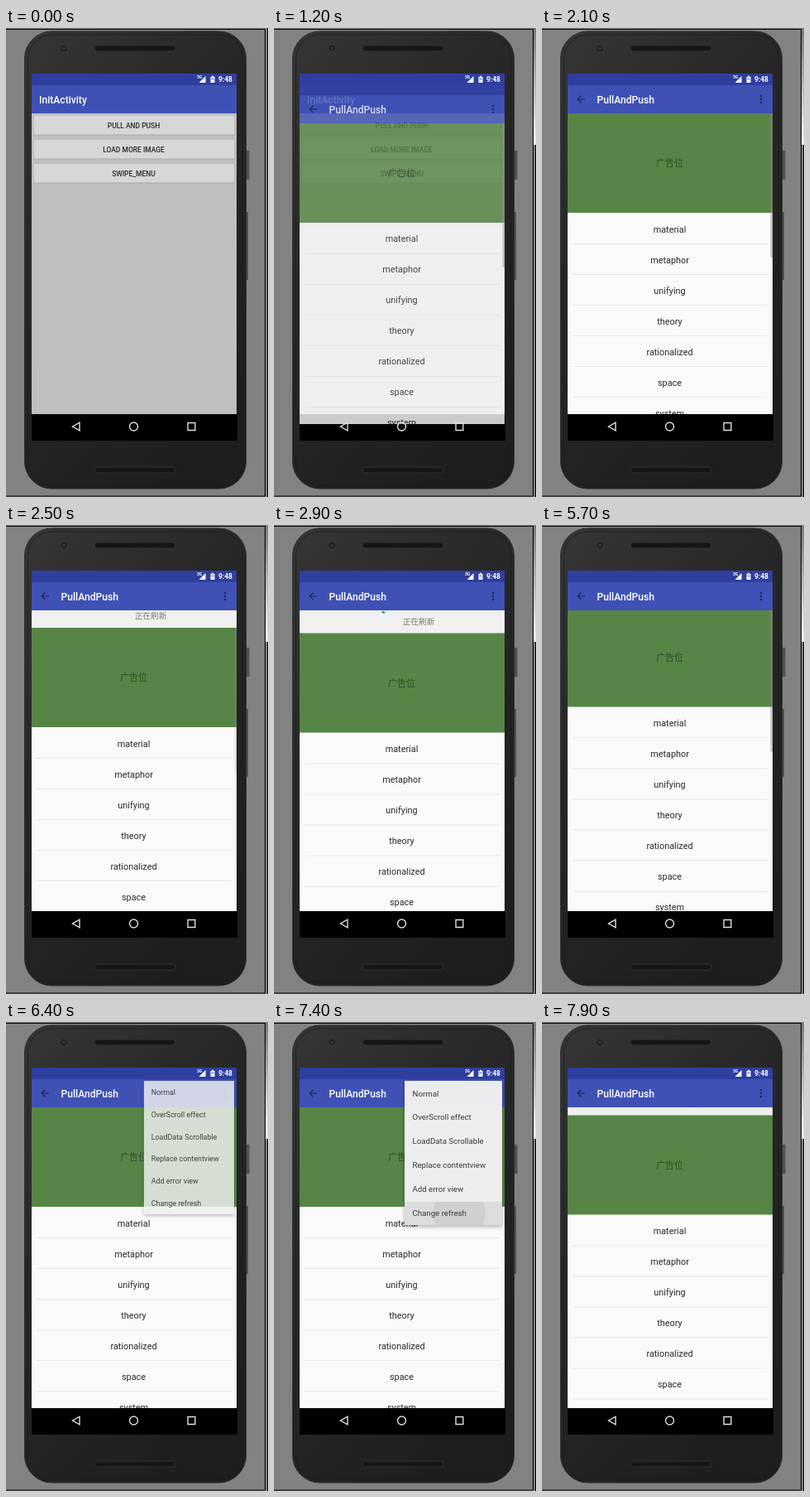
Recreate the animation shown at these times as an HTML page. Size 317x566 px, loop 8000 ms.

```html
<!DOCTYPE html>
<html lang="zh-CN">
<head>
<meta charset="utf-8">
<style>
  html, body { margin: 0; width: 100%; height: 100%; overflow: hidden; background: #828282; }
  svg { display: block; font-family: Roboto, 'Noto Sans CJK SC', 'Noto Sans CJK', sans-serif; }
  .mid { text-anchor: middle; }
  .title { font-size: 12.1px; font-weight: 500; fill: #fff; }
  .button { font-size: 8.46px; font-weight: 500; fill: #2a2a2a; }
  .row { font-size: 10.87px; fill: #2a2a2a; }
  .item { font-size: 9.67px; fill: #3a3a3a; }
  .card { filter: drop-shadow(0 2px 2.5px rgba(0, 0, 0, .3)); }
</style>
</head>
<body>
<svg width="317" height="566" viewBox="0 0 317 566">
  <defs>
    <linearGradient id="body" x2=".6" y2="1">
      <stop offset="0" stop-color="#363636"/><stop offset=".4" stop-color="#292929"/>
      <stop offset="1" stop-color="#1e1e1e"/>
    </linearGradient>
    <linearGradient id="edge" x2="0" y2="1">
      <stop offset="0" stop-color="#777"/><stop offset="1" stop-color="#f4f4f4"/>
    </linearGradient>
    <clipPath id="window"><path d="M31 55h248v411H31z"/></clipPath>
    <clipPath id="content"><path d="M31 103h248v363H31z"/></clipPath>
    <clipPath id="lastItem"><path d="M158 217h118v28H158z"/></clipPath>
  </defs>

  <!-- desktop and phone -->
  <path d="M0 0h317v566H0z" fill="#828282"/>
  <path d="M0 1.5h313.5V565H0" fill="none" stroke="#000"/>
  <path d="M316.5 0v566" stroke="#000"/>
  <path id="shade" d="M314 0h3v141h-3z" fill="url(#edge)"/>
  <path d="M290 148h4.500v35H290zM290 222h3v82h-3z" fill="#505050"/>
  <rect x="22.500" y="4" width="268" height="552" rx="33" fill="url(#body)" stroke="#2b2b2b"/>
  <rect x="26.500" y="8" width="260" height="544" rx="29" fill="none" stroke="#1c1c1c" stroke-opacity=".7"/>
  <circle cx="70" cy="24.500" r="4.500" fill="#222" stroke="#3a3a3a"/>
  <circle cx="70" cy="24.500" r="1.500" fill="#3a3d40"/>
  <g fill="#161616" stroke="#333">
    <rect x="107" y="21" width="98" height="7" rx="3.500"/>
    <rect x="107" y="530" width="98" height="7" rx="3.500"/>
  </g>

  <!-- first screen -->
  <path d="M31 466h249v32H31z"/>
  <path d="M31 55h248v411H31z" fill="#bfc1c0"/>
  <path d="M31 69h248v34H31z" fill="#3f51b5"/>
  <path d="M31 55h248v14H31z" fill="#303f9f"/>
  <text class="title" x="40" y="91">InitActivity</text>
  <g id="buttons"></g>
  <rect id="buttonPress" x="33.500" y="106" width="243" height="22.500" rx="1" fill-opacity=".1"/>

  <!-- second screen -->
  <g id="panel"><g clip-path="url(#window)">
    <path d="M31 103h248v363H31z" fill="#fafafa"/>
    <g clip-path="url(#content)">
      <g id="header">
        <path d="M31 75h248v56H31z" fill="#f0f0f0"/>
        <text class="item mid" x="175" y="119.500" style="fill:#777">正在刷新</text>
        <g id="spinner">
          <circle id="arc" cx="129" cy="117" r="12.200" fill="none" stroke="#138f90" stroke-width="2.400" pathLength="1"/>
        </g>
      </g>
      <g id="scroll">
        <path d="M31 103h248v440H31z" fill="#fafafa"/>
        <path d="M31 103h248v120H31z" fill="#578546"/>
        <text class="row mid" x="154.500" y="167" style="fill:#304a27">广告位</text>
        <g id="list"></g>
        <path id="scrollbar" d="M276.500 103h2.500v174h-2.500z" fill="#8c8c8c"/>
      </g>
    </g>
    <path d="M31 69h248v34H31z" fill="#3f51b5"/>
    <path d="M31 55h248v14H31z" fill="#303f9f"/>
    <path d="M52 86H43.500M47.500 81.700L43.200 86l4.300 4.300" fill="none" stroke="#1d2553" stroke-width="1.200"/>
    <text class="title" x="66.500" y="91">PullAndPush</text>
    <g fill="#1d2553">
      <circle cx="265" cy="82" r="1.200"/><circle cx="265" cy="86" r="1.200"/><circle cx="265" cy="90" r="1.200"/>
    </g>
  </g></g>

  <g id="menu">
    <rect class="card" x="158" y="71" width="118" height="174" rx="1" fill="#f0f0f0" fill-opacity=".98"/>
    <g id="itemPress" clip-path="url(#lastItem)">
      <path d="M158 217h118v28H158z" fill="#dcdcdc"/>
      <circle id="ripple" cx="224" cy="231" fill="#d0d0d0"/>
    </g>
    <g id="items"></g>
  </g>

  <!-- system icons -->
  <g fill="#fff">
    <text x="231" y="61" font-size="5" font-weight="700">3G</text>
    <path d="M241.500 58v8h-8zM247.500 59h1.500v-1.200h2V59h1.500v7h-5z"/>
    <path d="M248.500 60.500h3v2h-3z" fill="#8791c9"/>
    <text x="257" y="65" font-size="8.460" font-weight="700">9:48</text>
  </g>
  <g fill="none" stroke="#e0e0e0" stroke-width="1.400">
    <path d="M89 476.200v9.600L80.500 481zM220 476.500h8.800v9H220z"/>
    <circle cx="154.500" cy="481" r="5"/>
  </g>
</svg>
<script>
const $ = id => document.getElementById(id);
const LOOP = 8000, STEP = 100, HEADER = 27.5, ROW = 37;

$('buttons').innerHTML = ['PULL AND PUSH', 'LOAD MORE IMAGE', 'SWIPE_MENU'].map((label, i) => {
  const y = 106 + 29 * i;
  return `<rect x="33" y="${y}" width="244" height="23.5" rx="1" fill="#a9abaa"/>
    <rect x="33.5" y="${y}" width="243" height="22.5" rx="1" fill="#d6d7d7"/>
    <text class="button mid" x="154.5" y="${y + 14.5}">${label}</text>`;
}).join('');

$('list').innerHTML = ['material', 'metaphor', 'unifying', 'theory', 'rationalized', 'space', 'system'].map((word, i) =>
  `<text class="row mid" x="154.5" y="${246.5 + ROW * i}">${word}</text>
   <path d="M37 ${260.5 + ROW * i}h236" stroke="#e9e9e9"/>`).join('');

$('items').innerHTML = ['Normal', 'OverScroll effect', 'LoadData Scrollable', 'Replace contentview', 'Add error view', 'Change refresh']
  .map((label, i) => `<text class="item" x="167.5" y="${89.5 + 28.9 * i}">${label}</text>`).join('');

const PULL = [[2100, 0], [2300, 9], [2500, 21], [2700, HEADER], [5500, HEADER],
  [5600, 9], [5700, -3.5], [5800, 0], [7800, 0], [7900, 9.5]];
const BAR = [[2300, 1], [2700, 0], [5500, 0], [5600, 1], [6200, 1], [6300, 0]];
const MENU = [[6200, 0], [6300, .4], [6400, .85], [6500, 1], [7500, 1], [7600, .5], [7700, 0]];

const clamp = x => Math.min(1, Math.max(0, x));
const smooth = x => (x = clamp(x), x * x * (3 - 2 * x));

function track(keys, t) {
  const i = keys.findIndex(([time]) => time >= t);
  if (i < 0) return keys[keys.length - 1][1];
  if (i === 0) return keys[0][1];
  const [t0, v0] = keys[i - 1], [t1, v1] = keys[i];
  return v0 + (v1 - v0) * (t - t0) / (t1 - t0);
}

const set = (id, name, value) => $(id).setAttribute(name, value);
const show = (id, on) => set(id, 'visibility', on ? 'inherit' : 'hidden');
const moveY = (id, y) => set(id, 'transform', `translate(0 ${y})`);

function drawSpinner(t) {
  show('spinner', t >= 2900 && t < 5600);
  const turns = Math.max(0, t - 2870) / 1333, p = turns % 1;
  const start = .75 * smooth(p * 2 - 1), length = .75 * smooth(p * 2) - start + .04;
  const angle = 360 * (start + turns) - 90;
  set('arc', 'stroke-dasharray', `${length} 1`);
  set('arc', 'transform', `rotate(${angle} 129 117)`);
}

function draw(t) {
  show('shade', t >= 400);
  show('buttonPress', t >= 1000);

  const opening = t - 1132;
  moveY('panel', 35 * (1 - clamp(opening / 350)) ** 5);
  set('panel', 'opacity', 1 - (1 - clamp(opening / 200)) ** 4);

  const pull = track(PULL, t);
  moveY('scroll', pull);
  moveY('header', pull - HEADER);
  set('scrollbar', 'opacity', .5 * track(BAR, t));
  drawSpinner(t);

  const open = track(MENU, t), scale = t < 7000 ? .5 + .5 * open : 1;
  set('menu', 'opacity', open);
  set('menu', 'transform', `translate(276 71) scale(${scale}) translate(-276 -71)`);
  show('itemPress', t >= 7400);
  set('ripple', 'r', 32 + Math.max(0, t - 7400) * .3);
}

function tick(now) {
  draw(Math.floor(now % LOOP / STEP) * STEP);
  requestAnimationFrame(tick);
}
draw(0);
requestAnimationFrame(tick);
</script>
</body>
</html>
```
